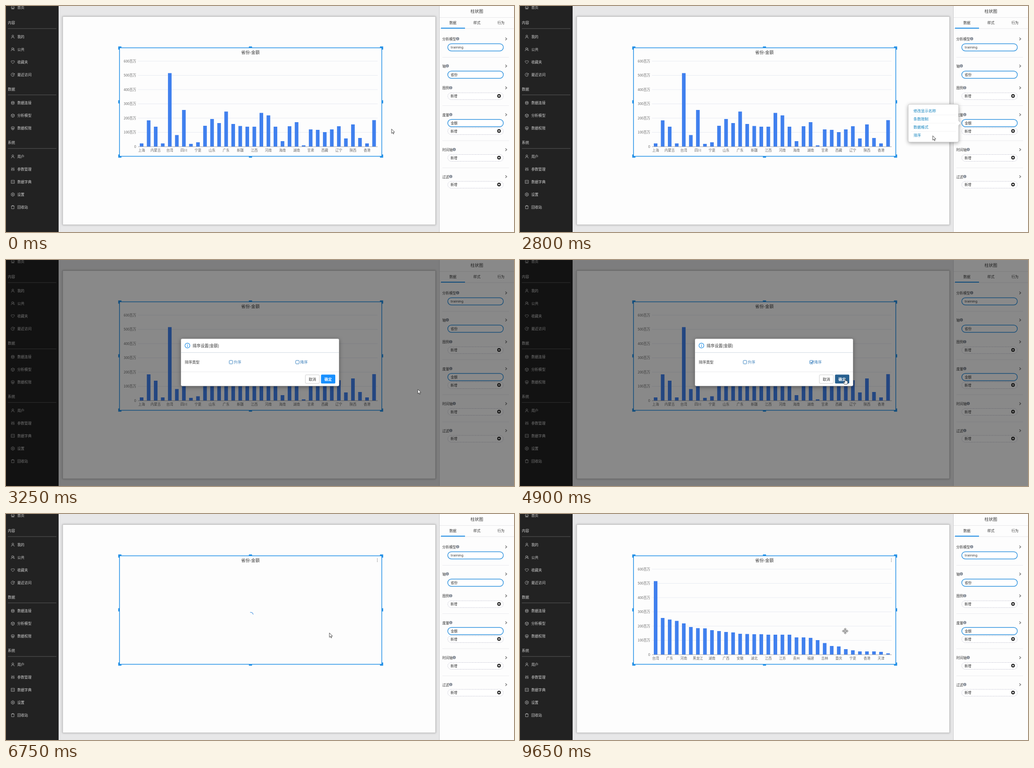
These frames come from a looping animation (1120x500 px, 9.7 s). An HTML page:

```html
<!DOCTYPE html>
<html>
<head>
<meta charset="utf-8">
<title>Chart sorting</title>
<style>
  html, body { margin: 0; width: 100%; height: 100%; overflow: hidden; background: #e7e7e8; }
  svg { display: block; width: 1120px; height: 500px; }
  text { font-family: "Noto Sans CJK SC", "Noto Sans CJK", "Noto Sans", sans-serif; }
  .latin { font-family: "Noto Sans", "Open Sans", sans-serif; }
  .icon { fill: none; stroke: #bdbdbd; stroke-width: .8; stroke-linejoin: round; }
  .shadow { filter: drop-shadow(0 2px 4px rgba(0,0,0,.35)); }
</style>
</head>
<body>
<svg id="stage" viewBox="0 0 1120 500" xmlns="http://www.w3.org/2000/svg">
  <g id="page"></g>
  <g id="chart"></g>
  <path id="spinner" fill="none" stroke="#3f8fe0" stroke-width="1" stroke-linecap="round" d="M3.9 -3.9A5.5 5.5 0 0 1 3.9 3.9"/>
  <g id="more" fill="#666"></g>
  <g id="popover"></g>
  <rect id="dim" width="1120" height="500" fill="#000"/>
  <g id="modal"></g>
  <g id="cursor">
    <path id="arrow" fill="#fff" stroke="#222" stroke-width=".8" stroke-linejoin="round" d="M0 0V9.9L2.3 7.8L3.8 11.2L5.3 10.5L3.8 7.2H6.9Z"/>
    <path id="hand" fill="#fff" stroke="#222" stroke-width=".8" stroke-linejoin="round" d="M-.9 .5Q0 -.6 .9 .5V4.2Q1.9 3.6 2.5 4.5Q3.5 4 4 5Q5.2 4.6 5.3 6V8.6L4.2 12H-1.6L-3.9 8Q-4.3 6.6 -3 6.7L-.9 8.4Z"/>
    <path id="mover" fill="#fff" stroke="#333" stroke-width=".8" stroke-linejoin="round"/>
  </g>
</svg>
<script>
const LOOP = 9700, BLUE = '#1f8ee6', INK = '#333';
const $ = id => document.getElementById(id);

// Markup helpers
const text = (s, x, y, size, fill = INK, extra = '') =>
  `<text x="${x}" y="${(y + size * .37).toFixed(2)}" font-size="${size}" fill="${fill}" ${extra}>${s}</text>`;
const mid = 'text-anchor="middle"', end = 'text-anchor="end"';
const box = (x, y, w, h, fill, extra = '') =>
  `<rect x="${x}" y="${y}" width="${w}" height="${h}" fill="${fill}" ${extra}/>`;
const line = (x1, x2, y, stroke, w = 1) =>
  `<path d="M${x1} ${y}H${x2}" stroke="${stroke}" stroke-width="${w}"/>`;
const path = (d, extra) => `<path d="${d}" ${extra}/>`;

// Sidebar icons, centred on 0,0
const icons = {
  home: 'M-4 0L0 -3.7L4 0M-2.8 -.8V3.5H2.8V-.8M-.9 3.5V1H.9V3.5',
  user: 'M-1.9 -1.7a1.9 1.9 0 1 0 3.8 0a1.9 1.9 0 1 0 -3.8 0M-3.3 3.8Q-3 .5 0 .5Q3 .5 3.3 3.8',
  group: 'M-2.6 -1.7a1.9 1.9 0 1 0 3.8 0a1.9 1.9 0 1 0 -3.8 0M-3.8 3.5Q-3.4 .5 -.7 .5Q1.5 .5 2.2 3M1.5 -3.4Q3.6 -2.2 2 0Q3.6 1 3.9 3.2',
  heart: 'M0 3.5L-3.3 .2Q-4.6 -2 -2.6 -3Q-.9 -3.5 0 -1.8Q.9 -3.5 2.6 -3Q4.6 -2 3.3 .2Z',
  clock: 'M3.5 -1A3.7 3.7 0 1 0 3.5 1M0 -2V.3L1.7 1.3M3.7 -3V-.8H1.6',
  base: 'M-3 -2.3a3 1.2 0 1 0 6 0a3 1.2 0 1 0 -6 0V2.4Q0 4.6 3 2.4V-2.3M-3 0Q0 2 3 0',
  cube: 'M0 -3.8L3.4 -2V2L0 3.8L-3.4 2V-2ZM-3.4 -2L0 -.2L3.4 -2M0 -.2V3.8',
  shield: 'M0 -3.8L3.2 -2.7V.6Q2.8 2.8 0 3.9Q-2.8 2.8 -3.2 .6V-2.7ZM-1.3 -.6H1.3V1.4H-1.3Z',
  sliders: 'M-2.6 -3.6V3.6M0 -3.6V3.6M2.6 -3.6V3.6M-3.6 1H-1.6M-1 -1.5H1M1.6 1.4H3.6',
  code: 'M-3.6 -3.4H3.6V3.4H-3.6ZM-.8 -1.3L-2 0L-.8 1.3M.8 -1.3L2 0L.8 1.3',
  gear: 'M-1.3 0a1.3 1.3 0 1 0 2.6 0a1.3 1.3 0 1 0 -2.6 0M-1 -3.8H1L1.5 -2.6L2.9 -2.7L3.8 -1L3 0L3.8 1L2.9 2.7L1.5 2.6L1 3.8H-1L-1.5 2.6L-2.9 2.7L-3.8 1L-3 0L-3.8 -1L-2.9 -2.7L-1.5 -2.6Z',
  bin: 'M-3.6 -2.4H3.6M-1.3 -2.4V-3.7H1.3V-2.4M-2.8 -2.4V3.6H2.8V-2.4'
};
const menu = [
  [3, '首页', 'home'], [37.3, '内容'], [68, '我的', 'user'], [96, '公共', 'group'],
  [124, '收藏夹', 'heart'], [152, '最近访问', 'clock'], [184, '数据'],
  [214.5, '数据连接', 'base'], [242.5, '分析模型', 'cube'], [270.5, '数据权限', 'shield'],
  [302.5, '系统'], [333, '用户', 'user'], [361, '参数管理', 'sliders'],
  [389, '数据字典', 'code'], [417, '设置', 'gear'], [445, '回收站', 'bin']
];

function sidebar() {
  return box(0, 0, 116, 500, '#222') + menu.map(([y, label, icon]) => icon
    ? path(icons[icon], `class="icon" transform="translate(15 ${y})"`) + text(label, 25, y, 7.8, '#d2d2d2')
    : text(label, 4, y, 8, '#d2d2d2') + line(4, 111, y + 12.7, '#686868', .8)).join('');
}

// Settings panel on the right
const heading = (label, y) => {
  const x = 962 + label.length * 7.6 + 3.4;
  return text(label, 962, y, 7.6) + `<circle cx="${x}" cy="${y - .5}" r="3.4" fill="#828a96"/>` +
    path(`M${x} ${y - 2.6}v1M${x} ${y - .9}v2.4`, 'stroke="#fff" stroke-width="1"') +
    path(`M1101 ${y - 3}l3 2.8l-3 2.8`, 'fill="none" stroke="#777" stroke-width="1.5"');
};
const field = (label, y, cls = '') =>
  box(974, y - 8, 122.5, 16, '#fff', `rx="8" stroke="#3294df" stroke-width="1.5"`) + text(label, 980.5, y, 7.6, INK, cls);
const adder = y =>
  box(974, y - 7.5, 122.5, 15, '#fff', 'rx="7.5" stroke="#bcbccb" stroke-width=".9" stroke-dasharray="2 1.5"') +
  text('新增', 980, y, 7.6) + `<circle cx="1087" cy="${y - .5}" r="3.9" fill="#111"/>` +
  path(`M1084.8 ${y - .5}h4.4M1087 ${y - 2.7}v4.4`, 'stroke="#fff" stroke-width="1.3"');

function panel() {
  return box(955, 0, 165, 500, '#fdfdfd') + path('M955.5 0V500', 'stroke="#ccc"') +
    text('柱状图', 1038, 12, 9.4, INK, mid) + line(956, 1120, 25.5, '#e6e6ea') + line(956, 1120, 50, '#e6e6ea') +
    ['数据', '样式', '行为'].map((s, i) => text(s, 985.3 + 53 * i, 37, 7.8, INK, mid)).join('') +
    line(959, 1012, 49, BLUE, 2) +
    [113.5, 220.5, 298, 358].map(y => line(962, 1109, y, '#ebebee')).join('') +
    heading('分析模型', 73) + field('training', 91.5, 'class="latin"') +
    heading('轴', 133) + field('省份', 152) + heading('图例', 181.3) + adder(199.5) +
    heading('度量', 240.7) + field('金额', 259) + adder(277) +
    heading('时间轴', 318) + adder(336) + heading('过滤', 377.7) + adder(395.5);
}

function widget() {
  const corner = (x, y, sx, sy) =>
    path('M0 0H7V3.5H3.5V7H0Z', `fill="${BLUE}" transform="translate(${x} ${y}) scale(${sx} ${sy})"`);
  return box(125, 23.5, 822, 460.5, '#fdfdfd', 'stroke="#c4c4c4" stroke-width="1" style="filter:drop-shadow(0 0 2px #0004)"') +
    box(250.3, 92.5, 578.2, 240, 'none', `stroke="${BLUE}" stroke-width="1.5"`) +
    corner(247.5, 89.5, 1, 1) + corner(831.5, 89.5, -1, 1) +
    corner(247.5, 335.5, 1, -1) + corner(831.5, 335.5, -1, -1) +
    box(535.5, 89.5, 7, 3.5, BLUE) + box(535.5, 332, 7, 3.5, BLUE) +
    box(247.5, 208.5, 3.5, 7, BLUE) + box(828, 208.5, 3.5, 7, BLUE) +
    text('省份-金额', 539, 102.8, 9.4, INK, mid);
}

// Chart
const BASE = 311, STEP = 15.53;
const heights = [7, 58, 44, 7, 162.5, 25.5, 81, 6, 9.5, 46, 61, 52, 77.5, 50, 45.5, 44, 44,
  74.5, 69, 44, 12, 45, 54, 2.7, 38, 37, 32, 38, 45, 18, 49, 19, 7, 58.5];
const sorted = [...heights].sort((a, b) => b - a);
const names = '上海 内蒙古 台湾 四川 宁夏 山东 广东 新疆 江西 河南 海南 湖南 甘肃 西藏 辽宁 陕西 香港'.split(' ');
const sortedNames = '台湾 广东 河南 黑龙江 湖南 广西 安徽 湖北 江西 江苏 贵州 福建 吉林 重庆 宁夏 香港 天津'.split(' ');

function buildChart() {
  let s = '';
  for (let i = 0; i <= 6; i++) {
    const y = BASE - 31.5 * i;
    if (i) s += line(291, 819.5, y, '#e3e6ef', .8);
    s += text(i ? i * 100 + '百万' : '0', 287, y, 7.5, '#666', end);
  }
  s += heights.map((_, i) => box((295 + STEP * i).toFixed(2), BASE, 8, 0, '#4080ee')).join('');
  s += line(291, 819.5, BASE + .3, '#9a9ca3', .9);
  s += names.map((_, i) => text('', 299 + 2 * STEP * i, 319.3, 7.5, '#666', mid + ' class="name"')).join('');
  $('chart').innerHTML = s;
}

function buildPopover() {
  $('popover').innerHTML =
    path('M859 217.5H964Q967 217.5 967 220.5V254L972 259L967 264V298Q967 301 964 301H859Q856 301 856 298V220.5Q856 217.5 859 217.5Z',
      'class="shadow" fill="#fff" stroke="#c6c6c6" stroke-width=".8"') +
    ['修改显示名称', '条数限制', '数据格式', '排序'].map((s, i) =>
      text(s, 867.5, 231.7 + 18.2 * i, 8.25, '#1484bf') + (i < 3 ? line(862, 961, 241 + 18.2 * i, '#f0f0f2', .8) : '')).join('');
}

function buildModal() {
  const check = (x, label) => box(x, 222.2, 7.6, 7.6, '#fff', 'rx="1.3" stroke="#337fc0" stroke-width="1"') +
    text(label, x + 10, 226, 8.2, '#337ab7');
  $('modal').innerHTML =
    box(385.5, 174, 349, 105, '#fff', 'rx="3" class="shadow" stroke="#777" stroke-width=".6"') +
    `<circle cx="400" cy="189.3" r="5.4" fill="none" stroke="${BLUE}" stroke-width="1.2"/>` +
    path('M400 186v1.3M400 188.4v4', `stroke="${BLUE}" stroke-width="1.2"`) +
    text('排序设置(金额)', 411.3, 189.3, 8.8) + line(386, 734, 204.7, '#cfd8e0') +
    text('排序类型', 394, 226, 8.2) + check(492.2, '升序') + check(638.7, '降序') +
    path('M640.4 225.6l2.2 2.3l4.6 -5', 'id="tick" fill="none" stroke="#2a72b5" stroke-width="1.5"') +
    line(386, 734, 247.5, '#e8e8ec') +
    box(660, 254, 31, 19, '#fff', 'rx="2" stroke="#c8c8c8" stroke-width=".9"') + text('取消', 675.6, 263.5, 8.2, INK, mid) +
    box(694.5, 253.5, 31.5, 19.7, '#1890ff', 'rx="2" id="ok"') + text('确定', 710.2, 263.5, 8.2, '#fff', mid + ' font-weight="700"');
}

// Pointer track: time, x, y
const track = [[0, 850, 272], [150, 850, 272], [1000, 985, 258], [2300, 985, 258], [2750, 910, 287],
  [2900, 910, 287], [3200, 908, 286], [3400, 908, 286], [4000, 643, 225], [4400, 643, 225],
  [4800, 717, 263], [5600, 717, 263], [5750, 713, 263], [7200, 713, 263], [7400, 717, 259], [LOOP, 717, 259]];

const ramp = (t, a, b) => Math.min(1, Math.max(0, (t - a) / (b - a)));
const smooth = p => p * p * (3 - 2 * p);
const cubicOut = p => 1 - (1 - p) ** 3;
const show = (id, on) => { $(id).style.opacity = +on; };

function pointer(t) {
  const i = Math.max(1, track.findIndex(k => k[0] > t));
  const [a, b] = [track[i - 1], track[i]], p = smooth(ramp(t, a[0], b[0]));
  return [a[1] + (b[1] - a[1]) * p, a[2] + (b[2] - a[2]) * p];
}

let bars, labels, labelled;

function render(t) {
  const loading = t >= 5700 && t < 7200, resorted = t >= 7200;
  const grow = resorted ? cubicOut(ramp(t, 7200, 8200)) : 1;
  show('chart', !loading);
  (resorted ? sorted : heights).forEach((h, i) => {
    bars[i].setAttribute('y', BASE - h * grow);
    bars[i].setAttribute('height', h * grow);
  });
  if (labelled !== resorted) {
    labels.forEach((el, i) => { el.textContent = (resorted ? sortedNames : names)[i]; });
    labelled = resorted;
  }
  show('spinner', loading);
  $('spinner').setAttribute('transform', `translate(539.5 223) rotate(${35 + (t - 6000) * .36})`);
  show('more', t >= 6250);

  show('popover', ramp(t, 1400, 1550) * (1 - ramp(t, 2900, 3000)));
  show('dim', .46 * ramp(t, 2900, 3050) * (1 - ramp(t, 5950, 6100)));
  const open = cubicOut(ramp(t, 2950, 3220)) * (1 - ramp(t, 5600, 5900));
  show('modal', open);
  $('modal').setAttribute('transform', `translate(0 ${-30 * (1 - open)})`);
  show('tick', t >= 4200);

  const [x, y] = pointer(t);
  const overOk = t >= 4700 && t < 5700;
  const hand = overOk || (t >= 930 && t < 2350) || (t >= 3950 && t < 4470);
  $('ok').setAttribute('fill', overOk ? '#286090' : '#1890ff');
  $('cursor').setAttribute('transform', `translate(${x} ${y})`);
  show('hand', hand);
  show('mover', t >= 7250);
  show('arrow', !hand && t < 7250);
}

$('page').innerHTML = box(0, 0, 1120, 500, '#e7e7e8') + widget() + panel() + sidebar();
$('more').innerHTML = [99.3, 102.3, 105.3].map(y => `<circle cx="818.7" cy="${y}" r=".75"/>`).join('');
$('mover').setAttribute('d', 'M0 -6.5L2.3 -4H.9V-.9H4V-2.3L6.5 0L4 2.3V.9H.9V4H2.3L0 6.5L-2.3 4H-.9V.9H-4V2.3L-6.5 0L-4 -2.3V-.9H-.9V-4H-2.3Z');
buildChart();
buildPopover();
buildModal();
bars = document.querySelectorAll('#chart rect');
labels = document.querySelectorAll('#chart .name');

const start = performance.now();
function tick() {
  render((performance.now() - start) % LOOP);
  requestAnimationFrame(tick);
}
tick();
</script>
</body>
</html>
```
